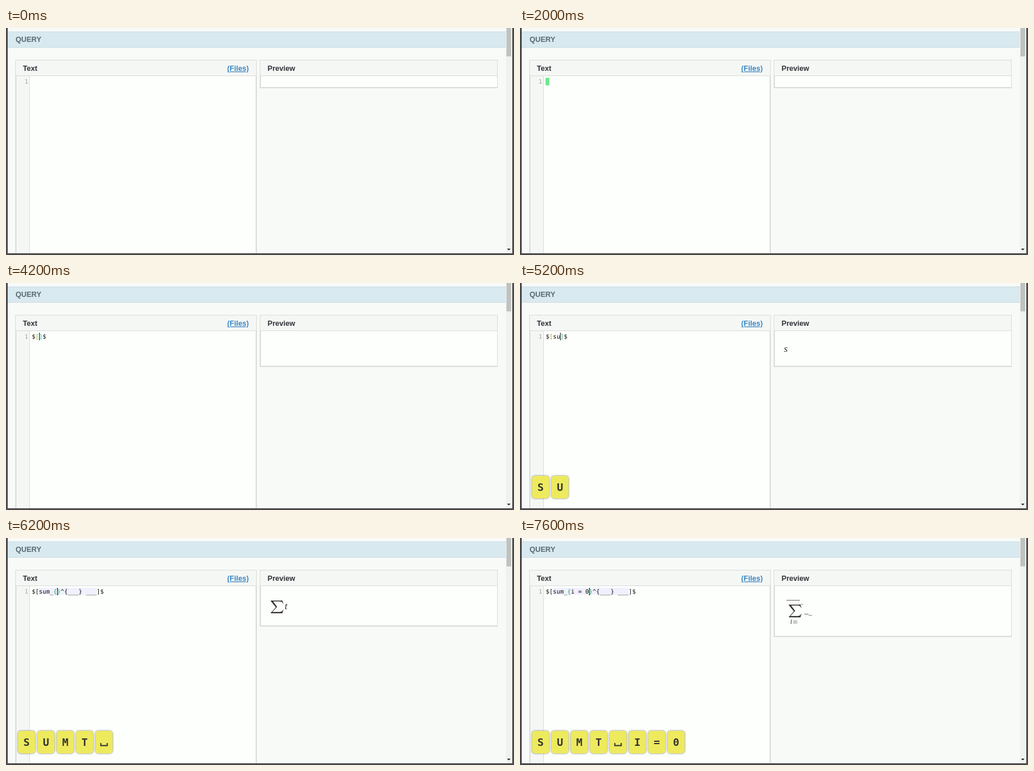
An HTML page that plays this animation: 875x392 px, repeating every 8000 ms.

```html
<!DOCTYPE html>
<html lang="en">
<head>
<meta charset="utf-8">
<title>Query editor</title>
<style>
  html, body { margin: 0; width: 100%; height: 100%; overflow: hidden; background: #f8faf8; }
  svg { display: block; }
  .head { font: bold 12.6px "Liberation Sans", Arial, sans-serif; fill: #2f3337; }
  .code { font: 10.3px "DejaVu Sans Mono", monospace; text-rendering: geometricPrecision; white-space: pre; }
  .math { font: italic 17px "Liberation Serif", serif; fill: #333; }
  .small { font-size: 12px; }
  .key rect { fill: #eeea5e; filter: drop-shadow(0 0 1.5px rgba(0, 0, 0, .55)); }
  .key text { font: bold 18px "DejaVu Sans Mono", monospace; fill: #333; text-anchor: middle; }
  .key path { fill: none; stroke: #333; stroke-width: 2; }
  .line { fill: #d8dcd9; }
  .panel { fill: #f5f7f5; stroke: #d8dcd9; }
  .paper { fill: #fdfffc; }
</style>
</head>
<body>
<svg id="stage" width="875" height="392" viewBox="0 0 875 392">
  <rect width="875" height="392" fill="#f8faf8"/>
  <rect x="3" y="6" width="858" height="28" fill="#d9e9f0"/>
  <path d="M3 6.5H861M3 33.5H861" stroke="#cbdde0"/>
  <text class="head" x="16.5" y="24" style="fill:#5a6a74">QUERY</text>

  <rect class="panel" x="16.5" y="55.5" width="415" height="360"/>
  <rect class="paper" x="41" y="83" width="389" height="310"/>
  <rect class="line" x="16" y="82" width="416" height="1"/>
  <rect class="line" x="40" y="83" width="1" height="310"/>
  <rect class="line" x="430" y="83" width="1" height="310"/>
  <rect class="line" x="17" y="83" width="1" height="310"/>
  <text class="head" x="29" y="74">Text</text>
  <text class="head" x="381" y="74" style="fill:#3a87c4" text-decoration="underline">(Files)</text>
  <text class="code" x="32" y="96" fill="#a0a4a0">1</text>

  <rect class="panel" x="437.5" y="55.5" width="409" height="27"/>
  <text class="head" x="450.5" y="74">Preview</text>
  <g id="preview">
    <rect id="frame" class="line" x="437" y="82" width="410"/>
    <rect id="sheet" class="paper" x="439" y="83" width="407"/>
  </g>
  <g id="math"></g>

  <rect id="mark" y="86" height="12" fill="#f0f0ff"/>
  <rect id="block" y="86" width="6.5" height="13" fill="#6ee88a"/>
  <text id="code" class="code" x="44.4" y="96"></text>
  <rect id="bar" y="86" width="1" height="13" fill="#111"/>
  <g id="keys"></g>

  <rect x="861" width="11" height="389" fill="#f0f2f0"/>
  <rect x="862" width="8" height="49" fill="#c0c2c0"/>
  <path d="M863 381H869L866 384Z" fill="#222"/>
  <path d="M1.5 0V390.5H873.5V0" fill="none" stroke="#4c4c4c" stroke-width="3"/>
</svg>
<script>
const LOOP = 8000, X0 = 44.4, CELL = 6.2;
const $ = id => document.getElementById(id);

// [time, text with | at the caret]
const typing = [
  [0, "|"], [2200, "$[|]$"], [4800, "$[s|]$"], [5000, "$[su|]$"],
  [5400, "$[sum|]$"], [5600, "$[sumt|]$"],
  [6200, "$[sum_{|}^{___} ___]$"], [6800, "$[sum_{i|}^{___} ___]$"],
  [7200, "$[sum_{i = |}^{___} ___]$"], [7600, "$[sum_{i = 0|}^{___} ___]$"]
];
const carets = [
  [0, ""], [600, "block"], [1200, ""], [2000, "block"], [2400, "bar"],
  [3000, ""], [3600, "bar"], [4400, ""], [4800, "bar"]
];
const presses = [
  [0, ""], [2200, "CTRL-9"], [4200, ""], [4800, "S"], [5000, "S U"],
  [5400, "S U M"], [5600, "S U M T"], [6200, "S U M T ␣"],
  [6800, "S U M T ␣ I"], [7200, "S U M T ␣ I ="], [7600, "S U M T ␣ I = 0"]
];

const glyph = (s, x, y, cls = "") => `<text class="math ${cls}" x="${x}" y="${y}">${s}</text>`;
const dash = (x, y, w, color = "#666") => `<rect x="${x}" y="${y}" width="${w}" height="1" fill="${color}"/>`;
const sum = (x, y) => `<path fill="#333" transform="translate(${x} ${y})" d="M0 0H20L21.8 5.5H21
  C20.2 2.5 18.5 1.4 15 1.4H4L11 11L2.6 19.8H15C18.5 19.8 20.2 18.5 21 16H21.8L20 22H0V21.3L8.8 11.8L0 .8Z"/>`;
const limits = sum(463, 115) + dash(459, 107, 23) + dash(483, 114, 5, "#999")
  + dash(490, 131, 7) + dash(497, 133, 6, "#888");
const equals = dash(470.5, 143, 7) + dash(470.5, 146, 7);

// [time, lower edge of the preview, formula]
const previews = [
  [0, 102, ""], [2600, 143, ""],
  [5200, 143, glyph("s", 454.5, 119)],
  [5400, 143, glyph("su", 454.5, 119)],
  [5600, 151, sum(456, 108)],
  [6000, 151, sum(456, 108) + glyph("t", 480, 123)],
  [6400, 169, limits],
  [7200, 169, limits + glyph("i", 472, 148, "small")],
  [7600, 169, limits + glyph("i", 465.5, 148, "small") + equals]
];

const at = (steps, t) => steps.findLast(s => s[0] <= t);
const show = (el, on) => el.setAttribute("visibility", on ? "visible" : "hidden");

function drawCode(source, caret) {
  const pos = source.indexOf("|"), text = source.replace("|", "");
  const matched = { "[": "#b8a01c", "]": "#1cb4a0", "{": "#20a84c", "}": "#20a84c" };
  $("code").innerHTML = [...text].map((ch, i) => {
    const near = i === pos || i === text.lastIndexOf(text[pos] === "}" ? "{" : "[", pos - 1);
    const first = text[pos] === "}" ? text.indexOf("{") : text.indexOf("[");
    const lit = (i === pos || (near && i === first)) && matched[ch];
    return `<tspan x="${(X0 + i * CELL).toFixed(1)}" fill="${lit || "#111"}">${ch}</tspan>`;
  }).join("");

  const snippet = text.includes("_");
  show($("mark"), snippet);
  $("mark").setAttribute("x", X0 + 2 * CELL);
  $("mark").setAttribute("width", Math.max(0, text.length - 4) * CELL);

  const x = X0 + pos * CELL;
  $("block").setAttribute("x", x - .4);
  $("bar").setAttribute("x", Math.round(x));
  show($("block"), caret === "block");
  show($("bar"), caret === "bar");
}

function drawKeys(list) {
  $("keys").innerHTML = list.split(" ").filter(Boolean).map((name, i) => {
    const x = 20.8 + i * 33.35, w = name.length > 1 ? 83.7 : 29.3, mid = x + w / 2;
    const label = name === "␣"
      ? `<path d="M${mid - 5.5} 354V358.5H${mid + 5.5}V354"/>`
      : `<text x="${mid}" y="359">${name}</text>`;
    return `<g class="key"><rect x="${x}" y="333" width="${w}" height="39" rx="5"/>${label}</g>`;
  }).join("");
}

function drawPreview(edge, formula) {
  $("frame").setAttribute("height", edge - 80);
  $("sheet").setAttribute("height", edge - 83);
  $("math").innerHTML = formula;
}

let last = "";
function render(now) {
  const t = now % LOOP;
  const steps = [typing, carets, presses, previews].map(s => at(s, t));
  const id = steps.map(s => s[0]).join();
  if (id !== last) {
    last = id;
    const [code, caret, press, view] = steps;
    drawCode(code[1], caret[1] || (t >= 2200 && t < 2400 ? "block" : ""));
    drawKeys(press[1]);
    drawPreview(view[1], view[2]);
  }
}

const start = performance.now();
function tick() {
  render(performance.now() - start);
  requestAnimationFrame(tick);
}
tick();
</script>
</body>
</html>
```
